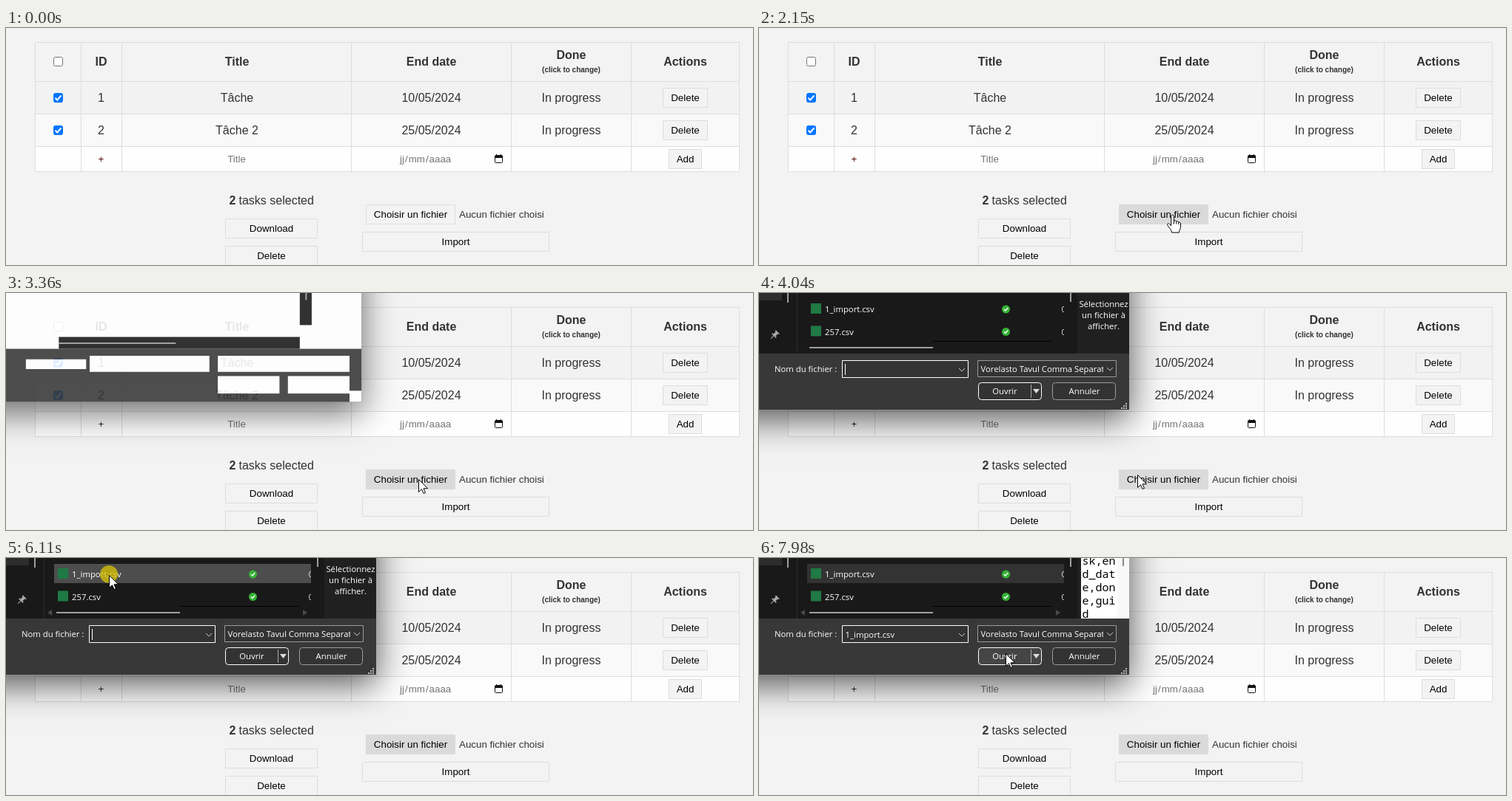
Write an HTML page with a canvas that moves like this. It is 1009x321 px and loops after 8000 ms.

```html
<!DOCTYPE html>
<html lang="en">
<head>
<meta charset="utf-8">
<title>Task import</title>
<style>
  html, body { margin: 0; width: 100%; height: 100%; overflow: hidden; background: #f3f3f3; }
  canvas { display: block; }
</style>
</head>
<body>
<canvas id="stage" width="1009" height="321"></canvas>
<script>
const LOOP = 8000, W = 1009, H = 321;
const stage = document.getElementById('stage').getContext('2d');
const layer = document.createElement('canvas');
layer.width = W;
layer.height = H;
const dialogCtx = layer.getContext('2d');
let g = stage;

const ARIAL = '"Liberation Sans", Arial, sans-serif';
const UI = '11.3px "Open Sans", "Noto Sans", sans-serif';
const SMALL = '13.333px ' + ARIAL;

// Pointer path: time, x, y
const PATH = [
  [330, 842, 319], [800, 710, 285], [1130, 668, 269], [1230, 668, 269],
  [1900, 560, 255], [2150, 558, 253], [2600, 557, 252], [3860, 557, 252],
  [4040, 511, 246], [4600, 330, 151], [5000, 230, 95], [5410, 150, 46],
  [5700, 139, 23], [6480, 139, 23], [7060, 312, 90], [7280, 318, 103],
  [7850, 333, 129], [8000, 333, 129]
];

function pointerAt(t) {
  const i = PATH.findIndex(p => p[0] > t);
  if (i < 1) return null;
  const [t0, x0, y0] = PATH[i - 1], [t1, x1, y1] = PATH[i];
  const k = (t - t0) / (t1 - t0);
  return { x: Math.round(x0 + (x1 - x0) * k), y: Math.round(y0 + (y1 - y0) * k) };
}

const inside = (p, x, y, w, h) => !!p && p.x >= x && p.x < x + w && p.y >= y && p.y < y + h;

function box(x, y, w, h, fill) {
  g.fillStyle = fill;
  g.fillRect(x, y, w, h);
}

function frame(x, y, w, h, fill, stroke, r = 0) {
  g.beginPath();
  g.roundRect(x + .5, y + .5, w - 1, h - 1, r);
  g.fillStyle = fill;
  g.fill();
  g.strokeStyle = stroke;
  g.lineWidth = 1;
  g.stroke();
}

function text(s, x, y, font, fill, align = 'left') {
  g.font = font;
  g.fillStyle = fill;
  g.textAlign = align;
  g.fillText(s, x, y);
}

function line(points, color, width) {
  g.beginPath();
  points.forEach(([x, y]) => g.lineTo(x, y));
  g.strokeStyle = color;
  g.lineWidth = width;
  g.stroke();
}

function disc(x, y, r, fill) {
  g.beginPath();
  g.arc(x, y, r, 0, Math.PI * 2);
  g.fillStyle = fill;
  g.fill();
}

function button(label, x, y, w, h, hover) {
  frame(x, y, w, h, hover ? '#dadada' : '#f3f3f3', hover ? '#dadada' : '#dddddd');
  text(label, x + w / 2, y + 18, SMALL, '#000', 'center');
}

function checkbox(y, on) {
  frame(64, y, 13, 13, on ? '#0075ff' : '#fff', on ? '#0075ff' : '#767676', 2);
  if (on) line([[66.5, y + 6.8], [69.3, y + 9.5], [74.5, y + 3.3]], '#fff', 2);
}

function drawTable(t) {
  box(39, 72, 952, 44, '#f2f2f2');
  box(39, 116, 952, 44, '#f9f9f9');
  box(39, 160, 952, 35, '#fefefe');
  for (const x of [39, 101, 156, 466, 682, 844, 990]) box(x, 19, 1, 176, '#ddd');
  for (const y of [19, 72, 116, 160, 194]) box(39, y, 952, 1, '#ddd');

  const bold = 'bold 16px ' + ARIAL, body = '16px ' + ARIAL, ink = '#333';
  const mid = [128.5, 312, 574.5, 763.5, 917.5];
  ['ID', 'Title', 'End date', 'Done', 'Actions'].forEach((s, i) =>
    text(s, mid[i], i === 3 ? 42 : 51, bold, ink, 'center'));
  text('(click to change)', 763.5, 60, 'bold 10px ' + ARIAL, ink, 'center');

  const rows = [['1', 'Tâche', '10/05/2024'], ['2', 'Tâche 2', '25/05/2024']];
  rows.forEach((row, i) => {
    const y = 100 + i * 44;
    [...row, 'In progress'].forEach((s, c) => text(s, mid[c], y, body, ink, 'center'));
    button('Delete', 887, y - 19, 61, 27);
    checkbox(y - 12, true);
  });
  checkbox(39, false);

  text('+', 128.5, 182, SMALL, t < 2950 ? '#5a0c0c' : '#222', 'center');
  text('Title', 311.5, 182, SMALL, '#757575', 'center');
  [['jj', 532], ['/', 539], ['mm', 543.7], ['/', 567], ['aaaa', 571.6]].forEach(([s, x]) =>
    text(s, x, 182, SMALL, '#757575'));
  frame(660, 172, 11, 11, '#fefefe', '#111', 1);
  box(660, 173, 11, 3, '#111');
  box(662, 171, 1, 2, '#111');
  box(668, 171, 1, 2, '#111');
  button('Add', 895, 164, 45, 27);
}

function drawPage(t, p) {
  box(0, 0, W, H, '#f3f3f3');
  drawTable(t);
  text('2', 301.5, 239, 'bold 16px ' + ARIAL, '#333');
  text('tasks selected', 314.5, 239, '16px ' + ARIAL, '#333');
  button('Download', 296, 258, 125, 27);
  button('Delete', 296, 295, 125, 27);
  button('Choisir un fichier', 486, 239, 121, 27, t > 3000 || inside(p, 486, 239, 121, 27));
  button('Import', 481, 276, 253, 27, inside(p, 481, 276, 253, 27));
  text('Aucun fichier choisi', 612, 257, SMALL, '#333');
}

function drawSkeleton() {
  box(-200, -200, 700, 358, '#fff');
  box(-200, 82, 700, 76, '#383838');
  box(412, -50, 17, 98, '#191919');
  box(420, -50, 2, 62, '#9f9f9f');
  box(68, 65, 344, 17, '#191919');
  box(68, 73, 167, 2, '#9f9f9f');
  box(21, 97, 86, 14, '#fff');
  box(112, 92, 171, 23, '#fff');
  box(295, 92, 188, 23, '#fff');
  box(295, 121, 88, 25, '#fff');
  box(395, 121, 88, 25, '#fff');
  box(483, 142, 17, 16, '#fff');
}

function fileRow(name, y, date, fill) {
  if (fill) box(65, y - 14, 347, 26, fill);
  box(70, y - 8, 14, 14, '#1f7a45');
  text(name, 89, y + 4, UI, '#fff');
  disc(333.5, y, 5.5, '#35b234');
  line([[330.8, y], [332.8, y + 2], [336.3, y - 2]], '#fff', 1.3);
  g.save();
  g.beginPath();
  g.rect(408, y - 10, 4, 20);
  g.clip();
  text(date, 408.5, y + 4, UI, '#ddd');
  g.restore();
}

function drawPin() {
  g.save();
  g.translate(21, 57);
  g.rotate(Math.PI / 4);
  g.fillStyle = '#aaa';
  g.fillRect(-2, -5, 4, 6);
  g.fillRect(-3.5, -6, 7, 1.6);
  g.fillRect(-4, 0, 8, 1.6);
  g.fillRect(-.5, 1, 1, 6);
  g.restore();
}

function drawPreview(t) {
  box(430, 0, 70, 82, '#202020');
  if (t < 6160) {
    ['Sélectionnez', 'un fichier à', 'afficher.'].forEach((s, i) =>
      text(s, 465.5, 18.5 + i * 15.3, UI, '#fff', 'center'));
    return;
  }
  box(435, 0, 65, 82, '#fff');
  box(484, 0, 16, 82, '#f8f8f8');
  box(491, 0, 2, 11, '#8a8a8a');
  g.save();
  g.beginPath();
  g.rect(435, 0, 50, 82);
  g.clip();
  ['sk,en', 'd_dat', 'e,don', 'e,gui', 'd'].forEach((s, i) =>
    text(s, 436.5, 9 + i * 18, '15px "Noto Sans Mono", "DejaVu Sans Mono", monospace', '#000'));
  g.restore();
}

function drawFiles(t, p) {
  const picked = t >= 6160;
  const hover1 = inside(p, 65, 8, 347, 27), hover2 = inside(p, 65, 39, 347, 27);
  box(0, 0, 31, 10, '#2d2d2d');
  box(38, 0, 2, 13, '#9f9f9f');
  drawPin();
  fileRow('1_import.csv', 22, '0', hover1 ? '#4d4d4d' : picked ? '#333' : null);
  fileRow('257.csv', 52.5, '0', hover2 ? '#4d4d4d' : null);
  box(235, 65, 160, 1, '#000');
  box(68, 73, 167, 2, '#9f9f9f');
  box(420, 0, 2, 12, '#9f9f9f');
  if (t > 5200) {
    g.fillStyle = '#4a4a4a';
    for (const [x, d] of [[56, 1], [407, -1]]) {
      g.beginPath();
      g.moveTo(x, 74);
      g.lineTo(x + 6 * d, 70);
      g.lineTo(x + 6 * d, 78);
      g.fill();
    }
  }
  drawPreview(t);
}

function chevron(x, y) {
  line([[x - 4, y - 2], [x, y + 2], [x + 4, y - 2]], '#ccc', 1);
}

function drawDialog(t, p) {
  box(-200, -200, 700, 282, '#191919');
  box(430, 0, 70, 82, '#202020');
  box(51, 0, 1, 82, '#2b2b2b');
  if (t >= 3800) drawFiles(t, p);
  box(-200, 82, 700, 76, '#383838');

  text('Nom du fichier :', 21, 106.5, UI, '#fff');
  frame(112, 91, 171, 24, '#333', '#fff');
  if (t >= 6160) text('1_import.csv', 116.5, 107.5, UI, '#fff');
  if ((t + 460) % 1060 < 530) box(116, 96, 1, 15, '#fff');
  chevron(274, 104);

  frame(295, 91, 188, 23, inside(p, 295, 91, 188, 23) ? '#3c3c3c' : '#333', '#9b9b9b');
  g.save();
  g.beginPath();
  g.rect(298, 92, 167, 20);
  g.clip();
  text('Vorelasto Tavul Comma Separated', 299.5, 107, UI, '#fff');
  g.restore();
  chevron(474, 103);

  frame(296, 121, 86, 24, inside(p, 296, 121, 86, 24) ? '#454545' : '#333', '#fff', 4);
  box(367, 124, 1, 18, '#aaa');
  g.beginPath();
  g.moveTo(370, 130);
  g.lineTo(379, 130);
  g.lineTo(374.5, 136);
  g.fillStyle = '#ddd';
  g.fill();
  text('Ouvrir', 332, 137, UI, '#fff', 'center');
  frame(396, 121, 86, 24, '#333', '#9b9b9b', 4);
  text('Annuler', 439.5, 137, UI, '#fff', 'center');

  for (let r = 0; r < 3; r++)
    for (let c = 2 - r; c < 3; c++) box(489 + c * 3, 149 + r * 3, 2, 2, '#bbb');
}

function drawShadow(right, bottom, alpha) {
  g.save();
  g.beginPath();
  g.rect(0, 0, W, H);
  g.rect(-300, -300, right + 300, bottom + 300);
  g.clip('evenodd');
  g.shadowColor = `rgba(0,0,0,${.65 * alpha})`;
  g.shadowBlur = 44;
  g.shadowOffsetY = 14;
  box(-300, -300, right + 300, bottom + 300, '#000');
  g.restore();
}

// The window grows and fades in, pausing briefly on the way
function drawWindow(t, p) {
  if (t < 3300) return;
  const clock = t < 3360 ? t : Math.max(3360, t - 100);
  const k = Math.min(1, (clock - 3300) / 225);
  const scale = 1 - .1 * (1 - k) ** 2;
  const alpha = Math.min(1, .55 + 1.25 * k);
  const dx = 130 * (1 - scale), dy = -37 * (1 - scale);

  drawShadow(500 * scale + dx, 158 * scale + dy, alpha);
  g = dialogCtx;
  g.setTransform(1, 0, 0, 1, 0, 0);
  g.clearRect(0, 0, W, H);
  g.setTransform(scale, 0, 0, scale, dx, dy);
  if (k < 1) drawSkeleton();
  else drawDialog(t, p);
  g = stage;
  g.globalAlpha = alpha;
  g.drawImage(layer, 0, 0);
  g.globalAlpha = 1;
}

const ARROW = new Path2D('M0 0V17L4 13.3L6.6 19L9 18L6.5 12.3H12Z');
const HAND = new Path2D('M-1.8 1.5C-1.8-1 2-1 2 1.5V8C3 6.8 5 7.2 5.2 8.8' +
  'C6.2 7.8 8 8.4 8.2 9.8C9.5 9 11 10 11 11.5V16C11 19 9 20 9 23.5H-1' +
  'C-1 20-4 18-6.5 14C-7.8 11.8-5.5 10.4-4 12L-1.8 14.2Z');

function drawPointer(t, p) {
  if (!p) return;
  if ((t >= 2330 && t < 2600) || (t >= 5960 && t < 6280))
    disc(p.x, p.y - 1, 12, 'rgba(212,192,8,.78)');
  const hand = t < 2650 && (inside(p, 486, 239, 121, 27) || inside(p, 481, 276, 253, 27));
  const shape = hand ? HAND : ARROW;
  g.save();
  g.translate(p.x + .5, p.y + .5);
  g.fillStyle = '#fff';
  g.strokeStyle = '#000';
  g.lineWidth = 1;
  g.fill(shape);
  g.stroke(shape);
  if (hand) {
    line([[2, 7], [2, 12]], '#000', 1);
    line([[5.2, 8.8], [5.2, 12]], '#000', 1);
    line([[8.2, 9.8], [8.2, 12.5]], '#000', 1);
  }
  g.restore();
  if (t >= 2650 && t < 3300) {
    const a = t / 130;
    g.lineWidth = 2.5;
    g.strokeStyle = '#8fc7ee';
    g.beginPath();
    g.arc(p.x + 15, p.y + 10, 5, 0, Math.PI * 2);
    g.stroke();
    g.strokeStyle = '#1878c8';
    g.beginPath();
    g.arc(p.x + 15, p.y + 10, 5, a, a + 2);
    g.stroke();
  }
}

const start = performance.now();

function render() {
  const t = (performance.now() - start) % LOOP;
  const p = pointerAt(t);
  drawPage(t, p);
  drawWindow(t, p);
  drawPointer(t, p);
  requestAnimationFrame(render);
}

render();
</script>
</body>
</html>
```
